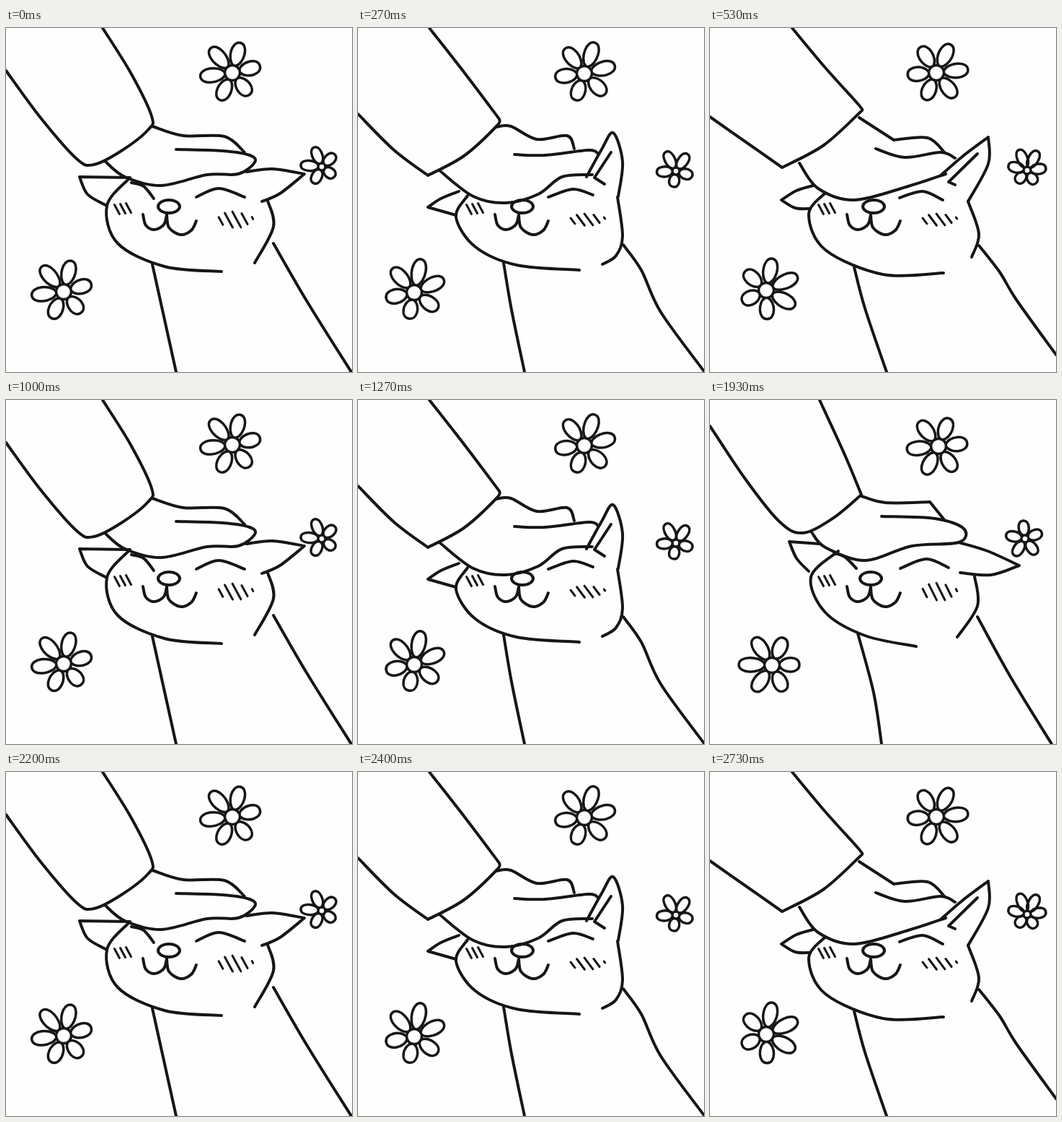
An HTML page for the animation above (2790 ms loop, 480 by 476 pixels).

```html
<!DOCTYPE html>
<html lang="en">
<head>
<meta charset="utf-8">
<title>Petting</title>
<style>
  html, body { margin: 0; width: 100%; height: 100%; overflow: hidden; background: #fefefe; }
  svg { display: block; width: 100%; height: 100%; }
  g { fill: none; stroke: #161616; stroke-width: 4; stroke-linecap: round; stroke-linejoin: round; }
  .flower { stroke-width: 3.5; }
  .blush { stroke-width: 3; }
</style>
</head>
<body>
<svg id="stage" viewBox="0 0 480 476" preserveAspectRatio="none"></svg>
<script>
const LOOP = 2790, FPS = 15, FRAMES_PER_POSE = 3.75;

// Key points joined by a smooth curve: "|" makes a corner, "/" lifts the pen.
// Flower: hub x, y, shift of the petal ring from the hub, turn in degrees, petal count.
const poses = [
  { // hand forward
    arm: `0,59 47,123 98,181 122,189 160,170 197,141 202,122 173,62 134,0
      / 203,136 246,149 303,150 331,172
      / 236,168 300,170 338,176 345,186 322,202 279,203 215,218 165,206 138,185`,
    ears: "171,207 102,206 | 113,230 138,245 / 333,199 370,195 414,202 | 380,229 355,240",
    head: "172,207 140,246 155,298 220,330 299,337 / 363,239 371,275 345,325",
    eyes: "174,214 191,219 205,236 / 264,234 295,222 331,234",
    body: "203,327 236,476 / 371,298 418,379 479,476",
    nose: 226, blushRise: 11,
    flowers: [[314, 62, -3, -2, -70, 6], [438, 192, -3, -2, -107, 5], [80, 365, -3, -3, -71, 6]]
  },
  { // hand back
    arm: `0,119 50,169 97,204 | 147,177 192,136 196,126 | 150,65 99,0
      / 192,137 212,136 248,154 290,149 300,167 / 217,175 260,176 320,169 333,174
      / 325,203 283,206 250,230 205,242 160,233 114,198`,
    ears: `140,226 115,236 97,248 | 136,259
      / 317,206 338,168 354,145 367,185 361,233 / 351,172 328,207 | 342,216`,
    head: "152,232 136,262 163,303 220,328 307,335 / 360,234 367,288 358,315 339,327",
    eyes: "264,234 298,223 326,231",
    body: "202,325 213,390 231,476 / 368,300 393,335 420,393 480,475",
    nose: 228, blushRise: 8,
    flowers: [[314, 63, 1, -3, -71, 6], [441, 198, -1, -4, -120, 5], [78, 366, 1, -5, -78, 6]]
  },
  { // hand back and down
    arm: `0,123 50,158 100,193 | 158,162 211,114 | 206,106 160,55 114,0
      / 207,124 255,155 | 302,152 326,173 / 230,167 270,179 320,172 340,180
      / 327,202 275,219 200,238 150,222 124,187`,
    ears: `143,218 120,225 99,238 | 118,249 139,250
      / 320,204 350,178 386,151 | 386,188 358,240 / 371,174 331,213 | 340,217`,
    head: "160,228 137,258 160,307 240,341 324,339 / 358,240 373,285 363,317",
    eyes: "263,235 295,226 323,238",
    body: "200,331 215,388 245,476 / 373,301 402,338 425,376 480,452",
    nose: 227, blushRise: 8,
    flowers: [[314, 62, 2, -1, -65, 6], [440, 197, 0, -5, -116, 6], [78, 363, 5, -2, -85, 6]]
  },
  { // hand on its way forward
    arm: `0,36 48,108 95,167 128,184 170,164 210,131 | 187,76 152,0
      / 210,133 243,142 305,141 | 326,167
      / 238,161 312,164 352,178 345,197 280,202 215,222 160,204 141,183`,
    ears: "152,199 110,196 | 120,219 137,237 / 345,197 385,209 429,229 | 390,242 347,239",
    head: "178,209 140,245 160,294 215,326 286,341 / 367,244 371,285 343,328",
    eyes: "172,212 187,217 203,233 / 264,233 300,220 331,232",
    body: "205,323 227,405 238,476 / 371,300 418,385 474,476",
    nose: 223, blushRise: 12,
    flowers: [[317, 64, -2, 0, -66, 6], [437, 192, -1, 1, -94, 5], [86, 367, -4, -1, -60, 6]]
  }
];
const mouth = "190,258 194,273 206,279 219,272 223,258 | 226,276 242,286 257,280 264,267";

// Catmull-Rom spline written as cubic segments
function curve(text) {
  const pts = text.trim().split(/\s+/).map(pair => pair.split(",").map(Number));
  const at = i => pts[Math.max(0, Math.min(pts.length - 1, i))];
  let d = "M" + pts[0];
  for (let i = 0; i < pts.length - 1; i++) {
    const [a, b, c, e] = [at(i - 1), at(i), at(i + 1), at(i + 2)];
    const out = b.map((v, k) => v + (c[k] - a[k]) / 6);
    const into = c.map((v, k) => v - (e[k] - b[k]) / 6);
    d += `C${out} ${into} ${c}`;
  }
  return d;
}

function strokes(text) {
  const split = text.replace(/(\S+) \|/g, "$1 / $1").split("/");
  return `<path d="${split.map(curve).join("")}"/>`;
}

// Petal tips lie evenly on a ring that sits slightly off the hub.
function flower([x, y, shiftX, shiftY, turn, count], spot) {
  const small = spot === 1;
  const [hub, ring, width] = small ? [5, 26, 9] : [10.5, 42, 12.5];
  let petals = "";
  for (let i = 0; i < count; i++) {
    const a = (turn + i * 360 / count) * Math.PI / 180;
    const dx = shiftX + ring * Math.cos(a), dy = shiftY + ring * Math.sin(a);
    const tip = Math.hypot(dx, dy), near = hub + (tip - hub) * 0.2;
    petals += `<path transform="rotate(${Math.atan2(dy, dx) * 180 / Math.PI})"
      d="M${hub},-2C${near},${-width} ${tip},${-width} ${tip},0C${tip},${width} ${near},${width} ${hub},2"/>`;
  }
  return `<g class="flower" transform="translate(${x} ${y})">${petals}<circle r="${hub}"/></g>`;
}

function blush(rise) {
  const hatch = (x, y, dx, dy) => `M${x - dx},${y - dy}L${x + dx},${y + dy}`;
  let d = "";
  for (let i = 0; i < 3; i++) d += hatch(154 + 8 * i, 251 - i, 3.5, 6.5);
  for (let i = 0; i < 5; i++) {
    const size = Math.sin(Math.PI * (i + 0.8) / 5);
    d += hatch(298 + 11 * i, 267 - i, 6 * size, rise * size);
  }
  return `<g class="blush"><path d="${d}"/></g>`;
}

const stage = document.getElementById("stage");
stage.innerHTML = poses.map(p => "<g>" +
  [p.arm, p.ears, p.head, p.eyes, p.body, mouth].map(strokes).join("") +
  `<ellipse cx="${p.nose}" cy="247" rx="15" ry="9"/>` +
  blush(p.blushRise) + p.flowers.map(flower).join("") + "</g>").join("");

const start = performance.now();
function draw() {
  const time = (performance.now() - start) % LOOP;
  const frame = Math.floor((time + 4) * FPS / 1000); // frame times are rounded to 10 ms
  const current = Math.floor(frame / FRAMES_PER_POSE) % poses.length;
  [...stage.children].forEach((g, i) => g.style.display = i === current ? "" : "none");
  requestAnimationFrame(draw);
}
draw();
</script>
</body>
</html>
```
